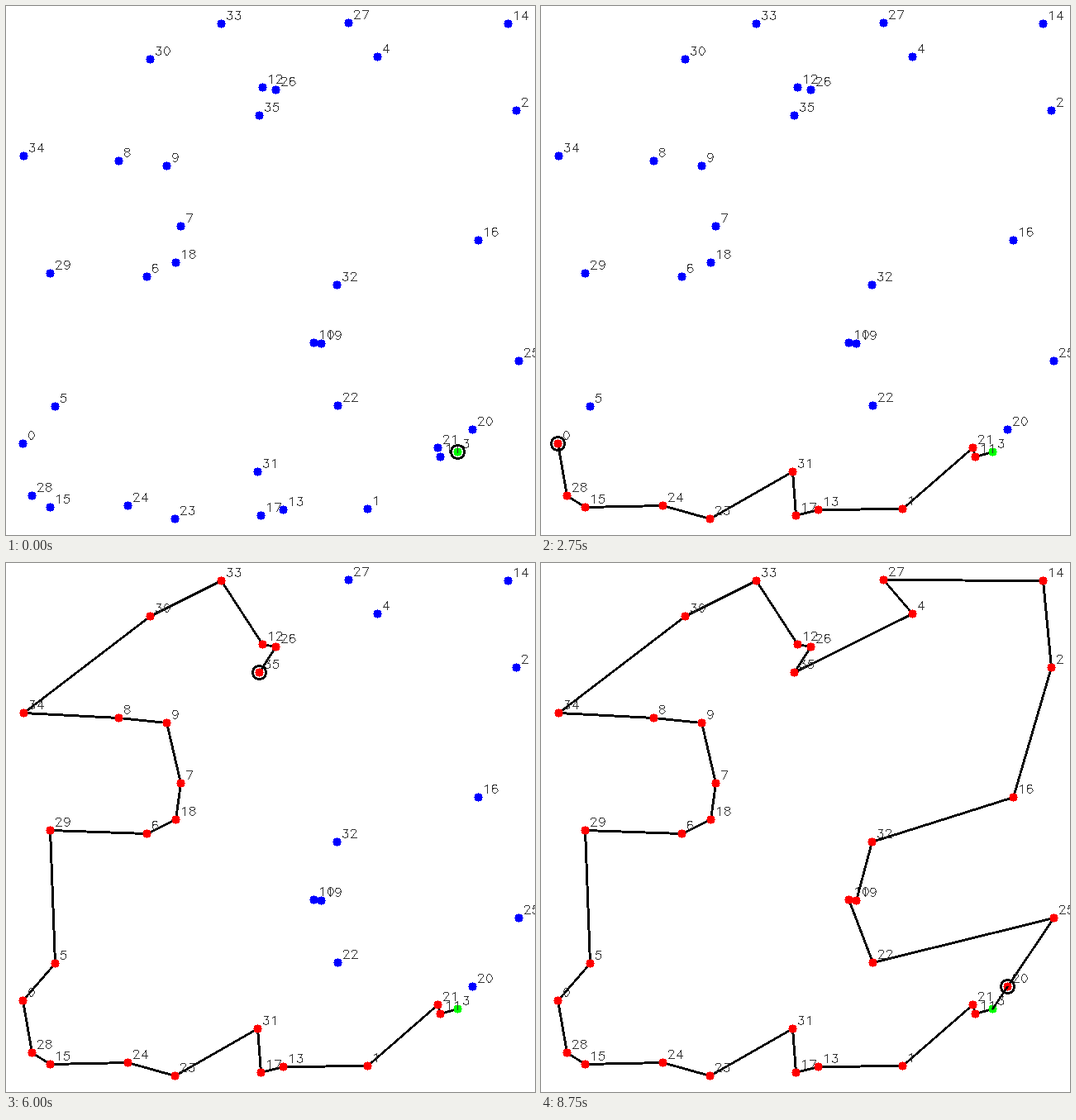
These frames come from a looping animation (640 by 640 pixels, 9000 ms). A matplotlib script:

```python
import numpy as np
import matplotlib.pyplot as plt
from matplotlib.animation import FuncAnimation
from matplotlib.collections import PatchCollection, PolyCollection
from matplotlib.patches import Annulus, Circle

SIZE, DPI = 640, 72
BLUE, RED, GREEN = "#0000ff", "#ff0000", "#00ff00"
INK = (0.2, 0.2, 0.2, 1)

# Cities in visiting order: label, x, y
TOUR = [
    (3, 546, 539), (11, 525, 545), (21, 522, 534), (1, 437, 608),
    (13, 335, 609), (17, 308, 616), (31, 304, 563), (23, 204, 620),
    (24, 147, 604), (15, 53, 606), (28, 31, 592), (0, 20, 529),
    (5, 59, 484), (29, 53, 323), (6, 170, 327), (18, 205, 310),
    (7, 211, 266), (9, 194, 193), (8, 136, 187), (34, 21, 181),
    (30, 174, 64), (33, 260, 21), (12, 310, 98), (26, 326, 101),
    (35, 306, 132), (4, 449, 61), (27, 414, 20), (14, 607, 21),
    (2, 617, 126), (16, 571, 283), (32, 400, 337), (19, 381, 408),
    (10, 372, 407), (22, 401, 483), (25, 620, 429), (20, 564, 512),
]
N = len(TOUR)
XY = np.array([city[1:] for city in TOUR], float)


def bowl(low, high, start=0, end=360, rx=7):
    """Arc of an ellipse centred in a digit cell, between two heights."""
    t = np.radians(np.linspace(start, end, 17))
    x = 10 + rx * np.cos(t)
    y = (low + high) / 2 + (high - low) / 2 * np.sin(t)
    return list(zip(x, y))


def digit_strokes():
    """Single-line digits on a 20 x 21 cell, y pointing up."""
    six = bowl(1, 21, 45, 180) + bowl(0, 13, 180, 540)
    return [
        [bowl(0, 21)],
        [[(6, 17), (8, 18), (11, 21), (11, 0)]],
        [bowl(10, 21, 175, -22, rx=6) + [(3, 0), (17, 0)]],
        [[(5, 21), (16, 21), (10, 13)] + bowl(0, 13, 75, -155)],
        [[(13, 0), (13, 21), (3, 7), (18, 7)]],
        [[(15, 21), (5, 21), (4, 12)] + bowl(0, 14, 125, -155)],
        [six],
        [[(3, 21), (17, 21), (7, 0)]],
        [bowl(12, 21, rx=6), bowl(0, 12)],
        [[(20 - x, 21 - y) for x, y in six]],
    ]


def plot_stroke(image, pts):
    """Draw a one pixel wide polyline without smoothing."""
    pts = np.floor(np.array(pts) + 0.5)
    for a, b in zip(pts[:-1], pts[1:]):
        steps = int(np.abs(b - a).max())
        for t in np.linspace(0, 1, steps + 1):
            x, y = np.floor(a + (b - a) * t + 0.5).astype(int)
            if 0 <= x < SIZE and 0 <= y < SIZE:
                image[y, x] = INK


def label_layer(scale=0.5):
    image = np.zeros((SIZE, SIZE, 4))
    digits = digit_strokes()
    for label, x, y in TOUR:
        for i, ch in enumerate(str(label)):
            left = x + 5 + 20 * scale * i
            for stroke in digits[int(ch)]:
                plot_stroke(image, [(left + scale * u, y - 5 - scale * v)
                                    for u, v in stroke])
    return image


def band(a, b):
    """Corners of a 2 px line, slimmer on diagonals where hard edges spread."""
    dx, dy = (b - a) / np.hypot(*(b - a))
    normal = np.array([-dy, dx])
    side = normal * (2 - np.abs(normal).min()) / 2
    return [a + side, b + side, b - side, a - side]


fig = plt.figure(figsize=(SIZE / DPI, SIZE / DPI), dpi=DPI, facecolor="white")
ax = fig.add_axes([0, 0, 1, 1])
ax.axis("off")

hard = dict(linewidths=0, antialiaseds=False)
bands = [band(a, b) for a, b in zip(XY, np.roll(XY, -1, axis=0))]
path = PolyCollection([], facecolors="black", zorder=1, **hard)
dots = PatchCollection([Circle(p, 4.525) for p in XY], zorder=2, **hard)
ring = Annulus(XY[0], 8.75, 1.6, fc="black", lw=0, aa=False, zorder=4)
closing = PolyCollection(bands[-1:], facecolors="black", zorder=5, **hard)

ax.imshow(label_layer(), interpolation="nearest", zorder=3, aspect="auto")
for item in (path, dots, closing):
    ax.add_collection(item, autolim=False)
ax.add_patch(ring)
ax.set_xlim(-0.5, SIZE - 0.5)
ax.set_ylim(SIZE - 0.5, -0.5)


def update(k):
    path.set_verts(bands[:k])
    dots.set_facecolor([GREEN] + [RED] * k + [BLUE] * (N - 1 - k))
    ring.center = XY[k]
    closing.set_visible(k == N - 1)
    return path, dots, ring, closing


anim = FuncAnimation(fig, update, frames=N, init_func=lambda: update(0),
                     interval=250, repeat=True, repeat_delay=0)
plt.show()
```
